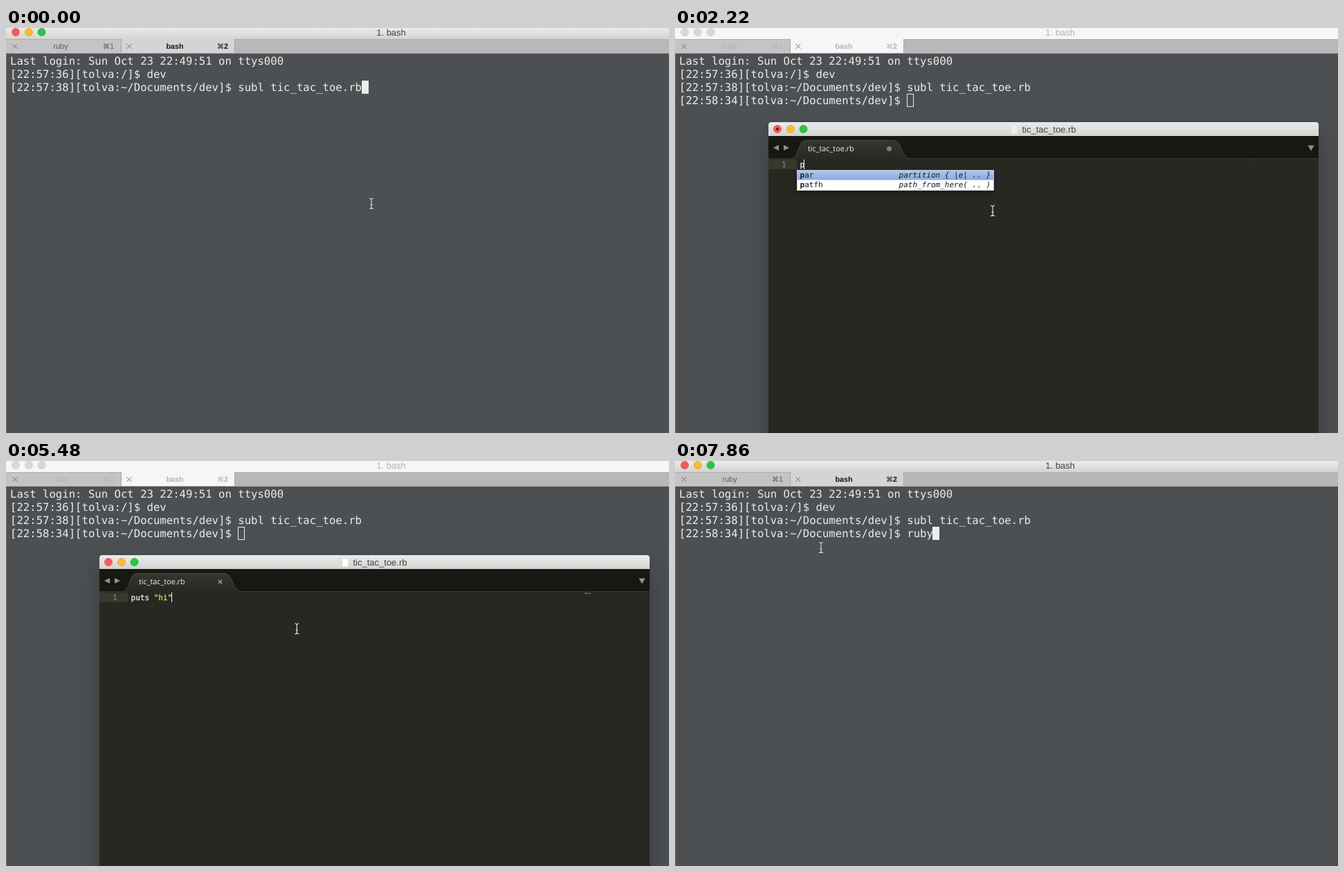
An HTML page for the animation above (8000 ms loop, 958 by 585 pixels).

```html
<!DOCTYPE html>
<html lang="en">
<head>
<meta charset="utf-8">
<title>Terminal and editor</title>
<style>
html, body { margin: 0; width: 100%; height: 100%; overflow: hidden; background: #4d5052; }
svg { display: block; width: 958px; height: 585px; }
text { white-space: pre; text-rendering: geometricPrecision; }
.term { font: 15.63px "DejaVu Sans Mono", monospace; fill: #ededed; }
.code { font: 11px "DejaVu Sans Mono", monospace; }
.ui { font: 13px "Liberation Sans", Arial, sans-serif; text-anchor: middle; fill: #404040; }
.tab { font-size: 11px; fill: #5a5a5a; }
.on { font-size: 10.7px; font-weight: bold; fill: #111; }
.sym { font: 10px "DejaVu Sans", sans-serif; }
.off > .ui { fill: #b2b2b2; }
.bar { fill: url(#bar); }
.off > .bar { fill: #f6f6f6; }
.active { fill: #d4d4d4; }
.off > .active { fill: #f6f6f6; }
.off > .light { fill: #d8d8d8; stroke: #c9c9c9; }
.cross { stroke: #777; fill: none; }
.shadow { filter: drop-shadow(0 14px 17px rgba(0,0,0,.25)); }
.off > .shadow { filter: drop-shadow(0 8px 10px rgba(0,0,0,.18)); }
</style>
</head>
<body>
<svg viewBox="0 0 958 585">
  <defs>
    <linearGradient id="bar" x2="0" y2="1"><stop stop-color="#ebebeb"/><stop offset="1" stop-color="#d3d3d3"/></linearGradient>
    <linearGradient id="tabFill" x2="0" y2="1"><stop stop-color="#34352f"/><stop offset="1" stop-color="#272822"/></linearGradient>
    <linearGradient id="pick" x2="0" y2="1"><stop stop-color="#afc7ee"/><stop offset="1" stop-color="#88a8df"/></linearGradient>
  </defs>

  <g id="terminal">
    <rect width="958" height="585" fill="#4d5052"/>
    <rect y="37" width="1" height="548" fill="#85705f"/>
    <rect class="bar" width="958" height="16"/>
    <rect y="16" width="958" height="21" fill="#b8b8b8"/>
    <rect y="16" width="166" height="21" fill="#c4c4c4"/>
    <rect class="active" x="167" y="16" width="163" height="21"/>
    <path d="M0 36.5H958M166.5 16V37M330.5 16V37" stroke="#a6a6a6"/>
    <path d="M0 16.5H166M331 16.5H958" stroke="#adadad"/>
    <text class="ui" x="556.5" y="10.5">1. bash</text>
    <path class="cross" d="M9.5 23l7 7m0-7l-7 7M174.500 23l7 7m0-7l-7 7"/>
    <text class="ui tab" x="79" y="30">ruby</text>
    <text class="ui tab" x="148" y="30"><tspan class="sym">⌘</tspan>1</text>
    <text class="ui tab on" x="244" y="30">bash</text>
    <text class="ui tab on" x="313" y="30"><tspan class="sym">⌘</tspan>2</text>
    <text class="term" x="6" y="53">Last login: Sun Oct 23 22:49:51 on ttys000</text>
    <text class="term" x="6" y="72">[22:57:36][tolva:/]$ dev</text>
    <text class="term" x="6" y="91">[22:57:38][tolva:~/Documents/dev]$ subl tic_tac_toe.rb</text>
    <text class="term" id="prompt" x="6" y="110"></text>
    <rect id="block" width="9" height="18" stroke="#ededed"/>
  </g>

  <g id="editor">
    <path class="shadow" d="M135 620V140q0-4 4-4H926q4 0 4 4V620z" fill="#272822"/>
    <path class="bar" d="M135 156V140q0-4 4-4H926q4 0 4 4V156z"/>
    <rect x="135" y="156" width="795" height="32" fill="#171812"/>
    <path d="M135 187.500H930" stroke="#0f100c"/>
    <path d="M135 188.500H930" stroke="#3a3b35"/>
    <path id="page" d="M485.500 140h6.500l3 3v10h-9.500z" fill="#fff" stroke="#c4c4c4" stroke-width=".6"/>
    <text class="ui" x="540.500" y="151">tic_tac_toe.rb</text>
    <path d="M150 169v8l-8-4zM157 169v8l8-4zM914.500 169.500h9l-4.500 8z" fill="#92938f"/>
    <rect x="135" y="190" width="41" height="14" fill="#38382d"/>
    <text class="code" x="154" y="201" fill="#8f908a">1</text>
    <g id="fileTab">
      <path d="M169 189C179 188 178 163 188 163H316C328 163 327 188 339 189z" fill="url(#tabFill)"/>
      <path d="M169 188.500C179 188 178 162.500 188 162.500H316C328 162.500 327 188 339 188.500" fill="none" stroke="#4b4c46"/>
      <text x="192" y="178" fill="#f2f2f0" style="font:500 10.8px 'Open Sans',sans-serif">tic_tac_toe.rb</text>
      <circle id="dirty" cx="309.500" cy="174.500" r="3.500" fill="#7e7f7b"/>
      <path id="clean" d="M307 172l5 5m0-5l-5 5" stroke="#a5a6a2" stroke-width="1.300"/>
    </g>
    <text class="code" x="180.600" y="201" fill="#f8f8f2" stroke="#f8f8f2" stroke-width=".25"><tspan id="word"></tspan><tspan id="string" fill="#e6db74" stroke="#e6db74"></tspan></text>
    <rect id="caret" y="190" width="1" height="14" fill="#f8f8f0"/>
    <rect id="mapWord" x="836" y="190.500" height="1.300" fill="#85867f"/>
    <rect id="mapString" x="841" y="190.500" height="1.300" fill="#7f7a4b"/>
    <g id="popup" class="code">
      <rect x="176.500" y="205.500" width="284" height="29" fill="#fff" stroke="#c8c8c8" style="filter:drop-shadow(0 3px 3px rgba(0,0,0,.4))"/>
      <rect x="177" y="206" width="283" height="13.500" fill="url(#pick)"/>
      <g fill="#1c1c1c">
        <text x="180.600" y="216"><tspan font-weight="bold">p</tspan>ar</text>
        <text x="180.600" y="230"><tspan font-weight="bold">p</tspan>atfh</text>
        <g font-style="italic" text-anchor="end">
          <text x="456" y="216">partition { |e| .. }</text>
          <text x="456" y="230">path_from_here( .. )</text>
        </g>
      </g>
    </g>
  </g>

  <g id="pointer">
    <path id="arrow" d="M0-1.500V12.500L3.200 9.500 5.600 15 8 14 5.600 8.700H10z" fill="#111" stroke="#fff"/>
    <g id="beam" fill="none">
      <path d="M-3-7.500Q0-7.500 0-5.500Q0-7.500 3-7.500M0-6V6M-3 7.500Q0 7.500 0 5.500Q0 7.500 3 7.500M-1.500 2H1.500" stroke="#222" stroke-width="2.400" opacity=".5"/>
      <path d="M-3-7.500Q0-7.500 0-5.500Q0-7.500 3-7.500M0-6V6M-3 7.500Q0 7.500 0 5.500Q0 7.500 3 7.500M-1.500 2H1.500" stroke="#f4f4f4" stroke-width="1.100"/>
    </g>
  </g>
</svg>

<script>
const LOOP = 8000, FRAME = 148;
const $ = id => document.getElementById(id);
const set = (id, attrs) => { for (const k in attrs) $(id).setAttribute(k, attrs[k]); };
const show = (id, on) => { $(id).style.display = on ? '' : 'none'; };

// Latest value whose start time has passed
const at = (steps, t) => steps.filter(s => s[0] <= t).pop()[1];

const shell = [[0, ''], [7560, 'r'], [7710, 'rub'], [7860, 'ruby']];
const typed = [[0, ''], [2220, 'p'], [2370, 'pu'], [2510, 'put'], [2660, 'puts'], [2960, 'puts '],
  [3250, 'puts ""'], [3700, 'puts "h"'], [3850, 'puts "hi"']];
const caretCol = [[0, 0], [2220, 1], [2370, 2], [2510, 3], [2660, 4], [2960, 5],
  [3250, 6], [3700, 7], [3850, 8], [4450, 9]];
const caretGlow = [[0, 0], [440, 1], [1630, .4], [1770, 0], [2220, 1], [4300, .1], [4450, 0],
  [4600, 1], [4890, .4], [5040, 0], [5330, 1]];

function addLights(group, xs, y) {
  const colors = ['#fc5b57', '#fdbc2e', '#28c940'], edges = ['#e2463f', '#e1a116', '#14ae2e'];
  xs.forEach((x, i) => $(group).insertAdjacentHTML('beforeend',
    `<circle class="light" cx="${x}" cy="${y}" r="5.500" fill="${colors[i]}" stroke="${edges[i]}" stroke-width=".7"/>`));
}
addLights('terminal', [14, 33, 51.5], 6);
addLights('editor', [148, 167, 185.5], 146);
$('editor').insertAdjacentHTML('beforeend', '<circle id="unsaved" cx="148" cy="146" r="2" fill="#6b0a08"/>');

function glide(t, start, end) {
  const p = Math.min(1, Math.max(0, (t - start) / (end - start)));
  return p * p * (3 - 2 * p);
}

function draw(t) {
  const open = t >= 290 && t < 6660;
  const focused = t >= 440 && t < 6660;
  const unsaved = t >= 2220 && t < 5330;

  $('terminal').setAttribute('class', focused ? 'off' : '');
  $('editor').setAttribute('class', focused ? '' : 'off');
  show('editor', open);
  show('fileTab', focused);
  show('unsaved', unsaved);
  show('dirty', unsaved);
  show('clean', !unsaved);
  show('popup', t >= 2220 && t < 2370);
  set('page', { opacity: !focused ? .4 : unsaved ? .5 : 1 });

  const input = at(shell, t);
  const launched = t >= 290;
  $('prompt').textContent = launched ? '[22:58:34][tolva:~/Documents/dev]$ ' + input : '';
  set('block', {
    x: launched ? 335.5 + Math.floor(input.length * 9.41) : 514.5,
    y: launched ? 95.5 : 76.5,
    fill: focused ? 'none' : '#ededed'
  });

  const line = at(typed, t), word = line.slice(0, 5), string = line.slice(5);
  $('word').textContent = word;
  $('string').textContent = string;
  set('mapWord', { width: word.trim().length });
  set('mapString', { width: string.length });
  set('caret', { x: Math.floor(180.2 + 6.62 * at(caretCol, t)), opacity: at(caretGlow, t) });

  const tick = Math.floor((t + 8) / FRAME) * FRAME;
  const a = glide(tick, 444, 1332), b = glide(tick, 5180, 6364);
  const x = 528 - 69 * a - 248 * b, y = 253.5 + 10.5 * a - 139 * b;
  const arrow = open && (t < 590 || y < 188);
  set('pointer', { transform: `translate(${x} ${y})` });
  show('arrow', arrow);
  show('beam', !arrow);
}

const begin = performance.now();
function loop() {
  draw((performance.now() - begin) % LOOP);
  requestAnimationFrame(loop);
}
draw(0);
requestAnimationFrame(loop);
</script>
</body>
</html>
```
